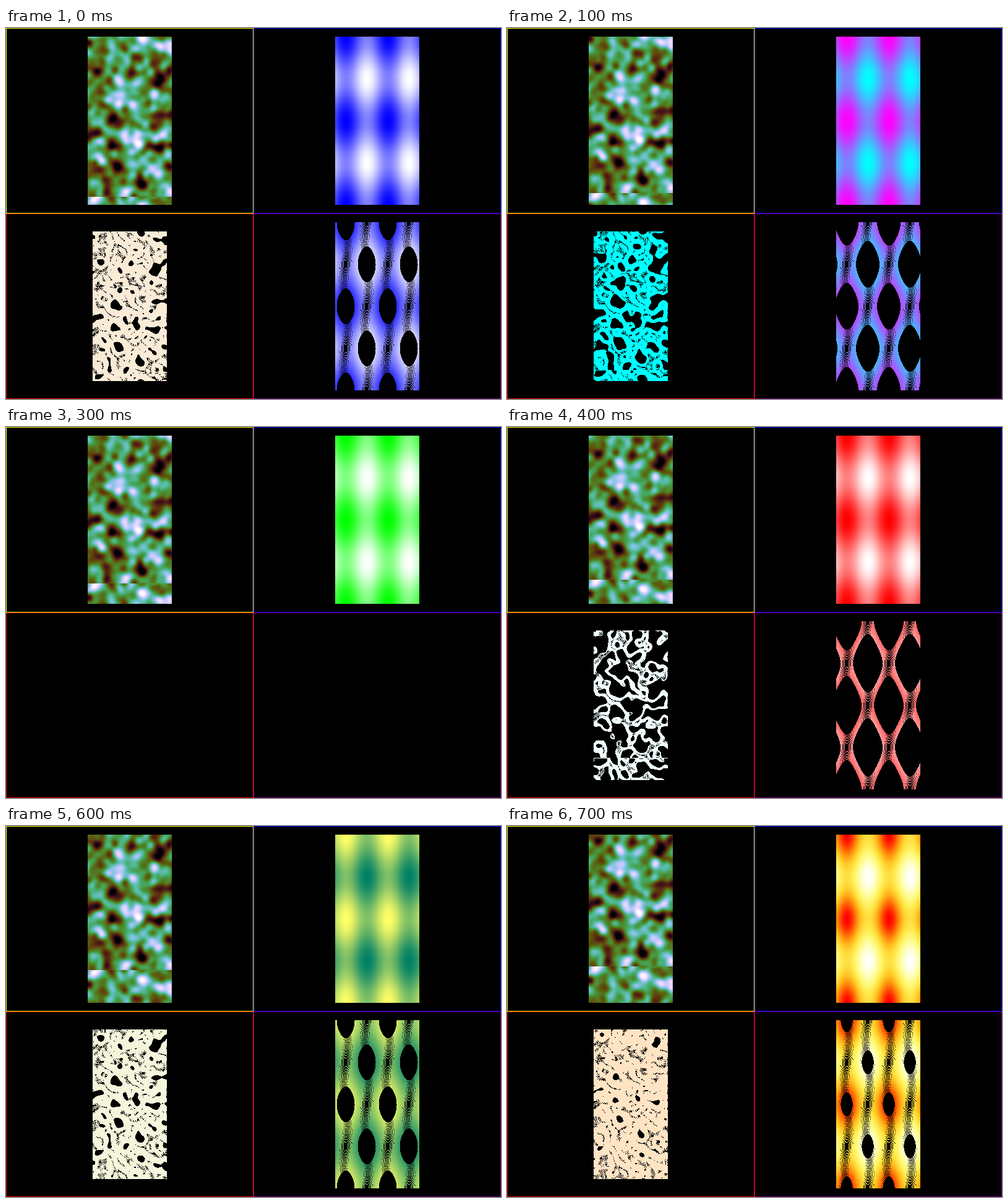
These frames come from a looping animation (800x600 px, 0.8 s). An HTML page with a canvas:

```html
<!DOCTYPE html>
<html lang="en">
<head>
<meta charset="utf-8">
<title>Isocurves</title>
<style>
  html, body { margin: 0; width: 100%; height: 100%; overflow: hidden; background: #000; }
  canvas { display: block; }
</style>
</head>
<body>
<canvas id="stage" width="800" height="600"></canvas>
<script>
const ctx = document.getElementById('stage').getContext('2d');
const W = 136, H = 272, STEP_MS = 100, STEPS = 8, LEVELS = 49, SCROLL = 6.65;

// ---- colours ----
const rgb = hex => [hex >> 16, hex >> 8 & 255, hex & 255].map(v => v / 255);
const mix = (a, b, t) => a.map((v, i) => v + (b[i] - v) * t);
const ramp = (low, high) => t => mix(rgb(low), rgb(high), t);
const toYellow = ramp(0xffffff, 0xffff00), toRed = ramp(0xffff00, 0xff0000);
const fire = t => mix(toYellow(t), toRed(t * t), t);
const greens = ramp(0xffffff, 0x00ff00);

// One look per step: wave colour map and terrain line colour.
const looks = [
  [ramp(0xffffff, 0x0000ff), 0xfaebd7],
  [ramp(0x00ffff, 0xff00ff), 0x00ffff],
  [greens, 0x7fffd4],
  [greens, 0x7fffd4],
  [ramp(0xffffff, 0xff0000), 0xf0ffff],
  [ramp(0xff00ff, 0xffff00), 0x0000ff],
  [ramp(0x008066, 0xffff66), 0xf5f5dc],
  [fire, 0xffe4c4]
];

function cubehelix(t) {
  const angle = 2 * Math.PI * (.5 / 3 + 1 + t);
  const amp = 1.2 * t * (1 - t) / 2;
  const c = Math.cos(angle), s = Math.sin(angle);
  return [
    t + amp * (-.14861 * c + 1.78277 * s),
    t + amp * (-.29227 * c - .90649 * s),
    t + amp * 1.97294 * c
  ];
}

// ---- terrain: smoothed seeded noise, pulled to its main peaks and pits ----
const terrain = new Float32Array(W * H).fill(.46);

function addBlob(cx, cy, height, radius) {
  const reach = radius * 3;
  const bottom = Math.min(H, cy + reach), right = Math.min(W, cx + reach);
  for (let y = Math.max(0, Math.floor(cy - reach)); y < bottom; y++) {
    for (let x = Math.max(0, Math.floor(cx - reach)); x < right; x++) {
      const d2 = (x - cx) ** 2 + (y - cy) ** 2;
      terrain[y * W + x] += height * Math.exp(-d2 / (2 * radius * radius));
    }
  }
}

let seed = 7;
const random = () => (seed = (seed * 16807) % 2147483647) / 2147483647;
const spread = size => random() * (size + 32) - 16;
for (let i = 0; i < 1200; i++) addBlob(spread(W), spread(H), random() < .5 ? .11 : -.11, 5.4);

function pull(points, value) {
  for (const [x, y] of points) addBlob(x, y, value - terrain[y * W + x], 7);
}
pull([[114, 26], [51, 87], [80, 178], [23, 211], [62, 261], [131, 261], [86, 11],
  [108, 104], [58, 172], [120, 172]], .88);
pull([[72, 72], [11, 71], [112, 74], [107, 90], [45, 141], [4, 173], [104, 191],
  [44, 216], [31, 263], [92, 248]], .1);

for (let i = 0; i < terrain.length; i++) terrain[i] = Math.min(1, Math.max(0, terrain[i]));

function terrainAt(x, y, shift) {
  x = Math.min(W - 1, x);
  y = (y + shift) % H;
  const x0 = Math.floor(x), y0 = Math.floor(y);
  const x1 = Math.min(W - 1, x0 + 1), y1 = Math.min(H - 1, y0 + 1);
  const row = r => terrain[r * W + x0] + (terrain[r * W + x1] - terrain[r * W + x0]) * (x - x0);
  return row(y0) + (row(y1) - row(y0)) * (y - y0);
}

const wave = (x, y) =>
  (Math.sin(4 * Math.PI * x / W) + Math.cos(4 * Math.PI * y / H) + 2) / 4;

// ---- drawing ----
function paint(left, top, w, h, colorAt) {
  const img = ctx.createImageData(w, h);
  for (let y = 0; y < h; y++) {
    for (let x = 0; x < w; x++) {
      const c = colorAt(x, y), i = (y * w + x) * 4;
      img.data[i + 3] = 255;
      if (c) for (let k = 0; k < 3; k++) img.data[i + k] = c[k] * 255;
    }
  }
  ctx.putImageData(img, left, top);
}

// A pixel is lit when one of the middle levels passes between it and a neighbour.
function contour(left, top, w, h, field, skip, color) {
  paint(left, top, w, h, (x, y) => {
    const t = field(x, y);
    const near = [t, field(x + 1, y), field(x, y + 1)].map(v => v * LEVELS);
    const first = Math.max(Math.floor(Math.min(...near)) + 1, skip);
    const last = Math.min(Math.floor(Math.max(...near)), LEVELS - skip);
    return first <= last ? color(t) : null;
  });
}

function frame(x, y, color) {
  ctx.strokeStyle = color;
  ctx.strokeRect(x + .5, y + .5, 399, 299);
}

function draw(step) {
  const shift = (step + 2) * SCROLL;
  const skip = 25 - 5 * Math.abs(step - 3);
  const [map, line] = looks[step];
  const lineColor = rgb(line);

  ctx.fillStyle = '#000';
  ctx.fillRect(0, 0, 800, 600);
  paint(132, 14, W, H, (x, y) => cubehelix(terrainAt(x, y, shift)));
  paint(532, 14, W, H, (x, y) => map(wave(x, y)));
  contour(140, 329, 120, 242, (x, y) => terrainAt(x * W / 120, y * H / 242, shift),
    skip, () => lineColor);
  contour(532, 314, W, H, wave, skip, map);

  frame(0, 0, '#ff0');
  frame(400, 0, '#00f');
  frame(0, 300, '#f00');
  frame(400, 300, '#800080');
}

let shown = -1;
const start = performance.now();
function tick() {
  const step = Math.floor((performance.now() - start) / STEP_MS) % STEPS;
  if (step !== shown) draw(shown = step);
  requestAnimationFrame(tick);
}
tick();
</script>
</body>
</html>
```
